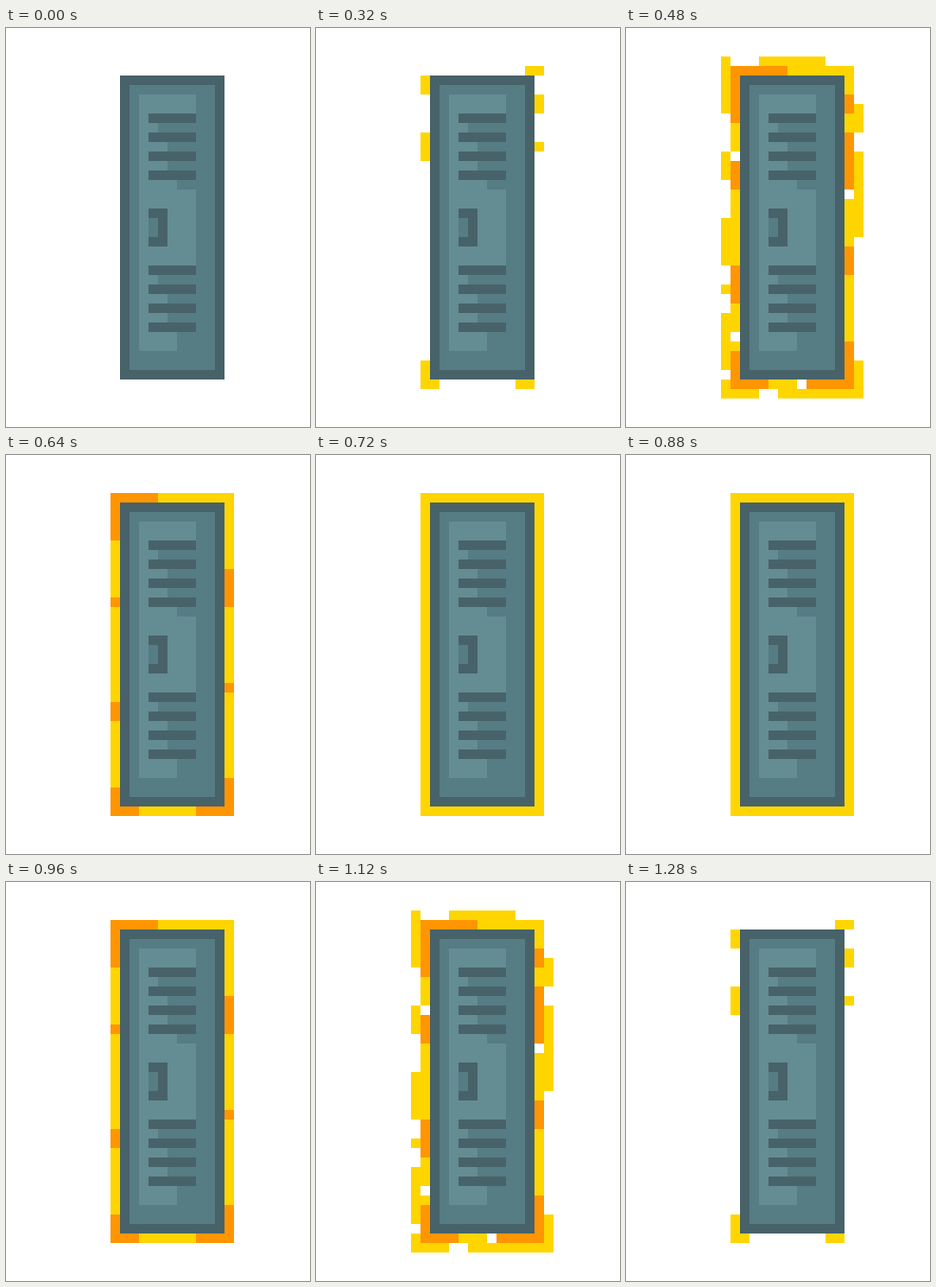
These frames come from a looping animation (320 by 420 pixels, 1360 ms). An HTML page with a canvas:

```html
<!DOCTYPE html>
<html>
<head>
<meta charset="utf-8">
<style>
html, body { margin: 0; width: 100%; height: 100%; overflow: hidden; background: #fff; }
canvas { display: block; }
</style>
</head>
<body>
<canvas id="stage" width="320" height="420"></canvas>
<script>
const ctx = document.getElementById('stage').getContext('2d');
const DARK = '#486269', MID = '#567c84', LIGHT = '#648c93';
const YELLOW = '#ffd500', ORANGE = '#ff9500', PALE = '#ffe34d', WHITE = '#fff';

// All positions are in cells of 10 px.
function box(color, x, y, w, h) {
  ctx.fillStyle = color;
  ctx.fillRect(x * 10, y * 10, w * 10, h * 10);
}

function slots(y) {
  box(MID, 15, y, 5, 7);
  for (let i = 0; i < 4; i++) {
    box(DARK, 15, y + i * 2, 5, 1);
    if (i < 3) box(LIGHT, 15, y + 1 + i * 2, i ? 2 : 1, 1);
  }
}

function locker() {
  box(DARK, 12, 5, 11, 32);
  box(MID, 13, 6, 9, 30);
  box(LIGHT, 14, 7, 6, 25);
  box(LIGHT, 14, 32, 4, 2);
  slots(9);
  box(MID, 18, 16, 2, 1);
  box(DARK, 15, 19, 2, 4);
  box(MID, 15, 20, 1, 2);
  slots(25);
}

// Centres of fire with their reach: x, y, radius.
const sparks = [
  [11, 5.5, 1], [11, 12, 2], [11, 36.5, 2], [21.5, 37, 1],
  [23, 12, 1], [23, 7.5, 1], [22.5, 4, 1]
];
const embers = [
  [11, 4, 5.5], [11, 15, 2], [11, 26.5, 2], [11, 37, 3.5],
  [23, 37, 4.5], [23, 24, 2], [23, 13.5, 3], [23, 7.5, 1]
];
const flames = [
  [10, 5.5, 3], [10, 14, 2], [10, 21.5, 2], [10, 32.5, 3], [11, 38, 3],
  [18.5, 38, 3], [24, 37, 3], [24, 17, 5], [24, 9, 2], [17, 3, 4]
];

const near = (spots, x, y, grow = 0) =>
  spots.some(([cx, cy, r]) => Math.abs(x - cx) + Math.abs(y - cy) < r + grow);

// A fixed random value from 0 to 1 for each cell.
function noise(x, y) {
  const v = Math.sin(x * 12.9898 + y * 78.233) * 43758.5453;
  return v - Math.floor(v);
}

// Depth 0 hugs the locker, depth 1 lies outside it.
function ring(depth, colorAt) {
  const left = 11 - depth, right = 23 + depth, top = 4 - depth, bottom = 37 + depth;
  for (let y = top; y <= bottom; y++) {
    const step = y === top || y === bottom ? 1 : right - left;
    for (let x = left; x <= right; x += step) {
      const color = colorAt(x, y);
      if (color) box(color, x, y, 1, 1);
    }
  }
}

const glow = (spots, grow) => (x, y) => near(spots, x, y, grow) && YELLOW;
const heat = grow => (x, y) => near(embers, x, y, grow) ? ORANGE : YELLOW;
const blaze = (x, y) =>
  near(embers, x, y) ? ORANGE : noise(x, y) > 0.15 && YELLOW;
const licks = (x, y) => (near(flames, x, y) || noise(x, y) < 0.1) && YELLOW;

const stages = [
  () => {},
  () => ring(0, glow(sparks, 0)),
  () => { ring(0, glow([...sparks, ...embers], 0)); ring(1, glow(flames, -2)); },
  () => { ring(0, blaze); ring(1, licks); },
  () => { ring(0, heat(0)); ring(1, glow(flames, -1)); },
  () => ring(0, heat(-1)),
  () => ring(0, () => YELLOW),
  () => ring(0, () => PALE)
];

const start = performance.now();

// The fire builds up to the pale outline, then runs back again.
function draw() {
  const t = (performance.now() - start) % 1360;
  const step = Math.max(0, Math.floor((t - 240) / 80));
  box(WHITE, 0, 0, 32, 42);
  stages[Math.min(step, 14 - step)]();
  locker();
  requestAnimationFrame(draw);
}
draw();
</script>
</body>
</html>
```
